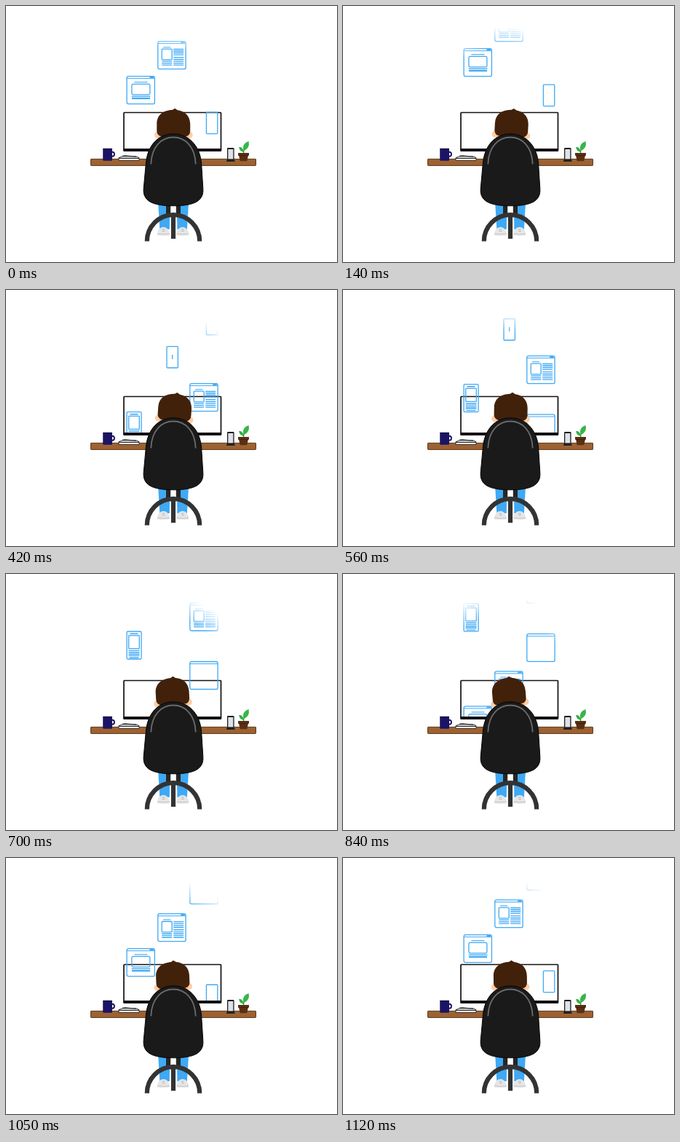
An HTML page that plays this animation: 455x352 px, repeating every 1190 ms.

```html
<!DOCTYPE html>
<html lang="en">
<head>
<meta charset="utf-8">
<title>Desk</title>
<style>
  html, body { margin: 0; width: 100%; height: 100%; overflow: hidden; background: #fff; }
  svg { display: block; width: 455px; height: 352px; }
  .icon { fill: none; stroke: #3fa9f5; stroke-width: 1.3; }
</style>
</head>
<body>
<svg viewBox="0 0 455 352">
  <defs>
    <radialGradient id="fade" gradientUnits="userSpaceOnUse" cx="216" cy="150" r="122">
      <stop offset=".76" stop-color="#fff"/>
      <stop offset="1" stop-color="#fff" stop-opacity="0"/>
    </radialGradient>
    <mask id="rise" maskUnits="userSpaceOnUse" x="0" y="0" width="455" height="196">
      <rect width="455" height="196" fill="url(#fade)"/>
    </mask>
    <g id="window">
      <rect x=".6" y=".6" width="38.3" height="38" rx="2.2"/>
      <path d="M.6 3.6H38.9" stroke-width="1"/>
    </g>
    <path id="buttons" d="M32 2.1h5.5" stroke-width="2"/>
    <g id="article">
      <use href="#window"/><use href="#buttons"/>
      <path d="M8 8.7h10" stroke-width="1"/>
      <rect x="6" y="11.2" width="14" height="14.6" rx="1"/>
      <path d="M22 11.5h14M22 14h14M22 16.5h14M22 19.2h14M22 22.7h14M22 25.5h14M6 28.2h14M22 28.2h14M6 30.6h14M22 30.6h14M6 33.2h14M22 33.2h14"/>
    </g>
    <g id="page">
      <use href="#window"/><use href="#buttons"/>
      <path d="M11 8.7h18" stroke-width="1.1"/>
      <rect x="7.4" y="11.4" width="25" height="14.4" rx="1.8"/>
      <path d="M7 28.2h26"/>
      <path d="M7.5 31h25" stroke-width="2.3"/>
    </g>
    <g id="tall">
      <rect x=".6" y=".6" width="20" height="38" rx="1.4"/>
      <path d="M5 3.8h11" stroke-width="1.6"/>
      <rect x="3.2" y="6.3" width="14.6" height="18" rx=".6"/>
      <path d="M3 27h15M3 29.4h15M3 31.8h15M3 34h15M4 36.6h13" stroke-width="1.4"/>
    </g>
    <rect id="slab" x=".6" y=".6" width="15.4" height="29.4" rx="1"/>
    <g id="marked"><use href="#slab"/><path d="M8.3 12v6"/></g>
    <g id="shoe">
      <path d="M0 11.2C-.4 4 4 0 8.5 0S17 4 17 11.2Q8.5 12.2 0 11.2Z" fill="#e6e6e6"/>
      <path d="M.2 9.2Q8.5 10.6 16.8 9.2" fill="none" stroke="#bdbdbd" stroke-width=".8"/>
      <path d="M6.5 3.2h4M6.8 5.6h3.6" stroke="#aaa" stroke-width=".8"/>
    </g>
  </defs>

  <!-- monitor -->
  <rect x="162" y="146.5" width="133.5" height="52" rx=".8" fill="#fff" stroke="#111" stroke-width="1.7"/>
  <rect x="161.2" y="196" width="135" height="4" rx="1" fill="#140d14"/>

  <!-- desk -->
  <rect x="116.5" y="210.4" width="227" height="9" rx=".6" fill="#9c6233" stroke="#5c3516"/>

  <!-- mug -->
  <circle cx="146" cy="203.7" r="3" fill="none" stroke="#1b1464" stroke-width="1.9"/>
  <path d="M133.2 196h12.8v15.4q0 1.3-1.3 1.3h-10.2q-1.3 0-1.3-1.3Z" fill="#1b1464"/>
  <path d="M133.5 196.3h12.2" stroke="#0c083c"/>

  <!-- papers and pen -->
  <path d="M155 208.6l5-1.8h19l4 1.8v3.7h-28Z" fill="#fff" stroke="#222" stroke-width=".9"/>
  <path d="M155 209.4h28M160 206.4l4-.5 15 1.3" fill="none" stroke="#222" stroke-width="1.1"/>

  <!-- phone -->
  <rect x="304" y="195" width="9.6" height="18" rx="1.3" fill="#1d1d1f"/>
  <rect x="305.3" y="197" width="7" height="13.4" fill="#dfe2e6"/>
  <path d="M303 212h11.6v2H303Z" fill="#222"/>

  <!-- plant -->
  <path d="M326.5 203q-.4-4 2-7M326.5 201q-1.5-3-3.5-4.5" fill="none" stroke="#1d8a3b" stroke-width="1.1"/>
  <path d="M326.7 199.2Q323.6 189.3 333.7 186Q335.5 196 326.7 199.2Z" fill="#39b54a"/>
  <path d="M326.5 200.5Q321 200 320.2 193.7Q326.5 194.2 326.5 200.5Z" fill="#2fae45"/>
  <path d="M319 202h15v3.4h-1.1l-1.6 7.8h-9.6l-1.6-7.8H319Z" fill="#5a3013"/>
  <path d="M319.6 205.6h13.8" stroke="#371b08" stroke-width=".8"/>

  <g mask="url(#rise)"><g id="icons" class="icon"></g></g>

  <!-- head -->
  <g id="head">
    <ellipse cx="208" cy="177.4" rx="4" ry="4.4" fill="#ffcda5"/>
    <ellipse cx="252.6" cy="177.4" rx="4" ry="4.4" fill="#ffcda5"/>
    <rect x="210" y="168" width="41" height="22" rx="9" fill="#f7bd91"/>
    <path d="M207.3 162C207.5 149 217 143.4 229 142.8L232 140.8L236 143.2C246 144.6 253 151 253.2 162V172Q253 178 247 179.5H214Q207.5 178 207.3 172Z" fill="#42210b"/>
  </g>

  <!-- legs -->
  <path d="M209 268h16.4l-.6 39h-13.5ZM234.8 268h16.4l-2.3 39h-13.5Z" fill="#3fa9f5"/>
  <use href="#shoe" x="208" y="304"/>
  <use href="#shoe" x="234.3" y="304"/>

  <!-- chair -->
  <path d="M220 272h6.2v16H220ZM233.8 272h6.2v16h-6.2Z" fill="#262626"/>
  <path d="M193.8 323.5A36.2 36.4 0 0 1 266.2 323.5" fill="none" stroke="#333" stroke-width="6.2"/>
  <path d="M226.9 285h6.2v35h-6.2Z" fill="#333"/>
  <path d="M230 175.8C209 175.8 194.5 192 192.4 216L189.2 251C188 267 199 274.8 230 274.8S272 267 270.8 251L268.6 216C266.5 192 251 175.8 230 175.8Z" fill="#1a1a1a" stroke="#050505"/>
  <path d="M199.3 217.5C200 193 214 180.5 230 180.5S260 193 260.7 217.5" fill="none" stroke="#6b6b6b" stroke-width="1.8"/>
</svg>
<script>
  const STEP = 70, LOOP = 1190, SPAN = 326;

  // shape, x, top edge when the loop begins
  const icons = [
    ['article', 208.2, 48], ['page', 165.5, 96], ['slab', 274.8, 145.6],
    ['window', 252.2, -3.5], ['article', 252.2, 242], ['tall', 165.5, 281],
    ['marked', 220.4, 191]
  ].map(([shape, x, top]) => {
    const el = document.createElementNS('http://www.w3.org/2000/svg', 'use');
    el.setAttribute('href', '#' + shape);
    document.getElementById('icons').append(el);
    return { el, x, top };
  });
  const head = document.getElementById('head');

  // climb is even, with a short hurry halfway
  function climb(step) {
    if (step <= 8) return step * 19;
    if (step < 10) return 152 + (step - 8) * 25.3;
    return 202.6 + (step - 10) * 19.07;
  }

  function draw(now) {
    const s = climb(Math.floor((now % LOOP) / STEP));
    for (const { el, x, top } of icons) {
      const y = (top - s + 44 + SPAN) % SPAN - 44;
      el.setAttribute('transform', `translate(${x} ${y})`);
    }
    const tilt = 4.8 * Math.sin(2 * Math.PI * s / SPAN);
    head.setAttribute('transform', `rotate(${tilt} 230 190)`);
  }

  const start = performance.now();
  function tick() {
    draw(performance.now() - start);
    requestAnimationFrame(tick);
  }
  tick();
</script>
</body>
</html>
```
